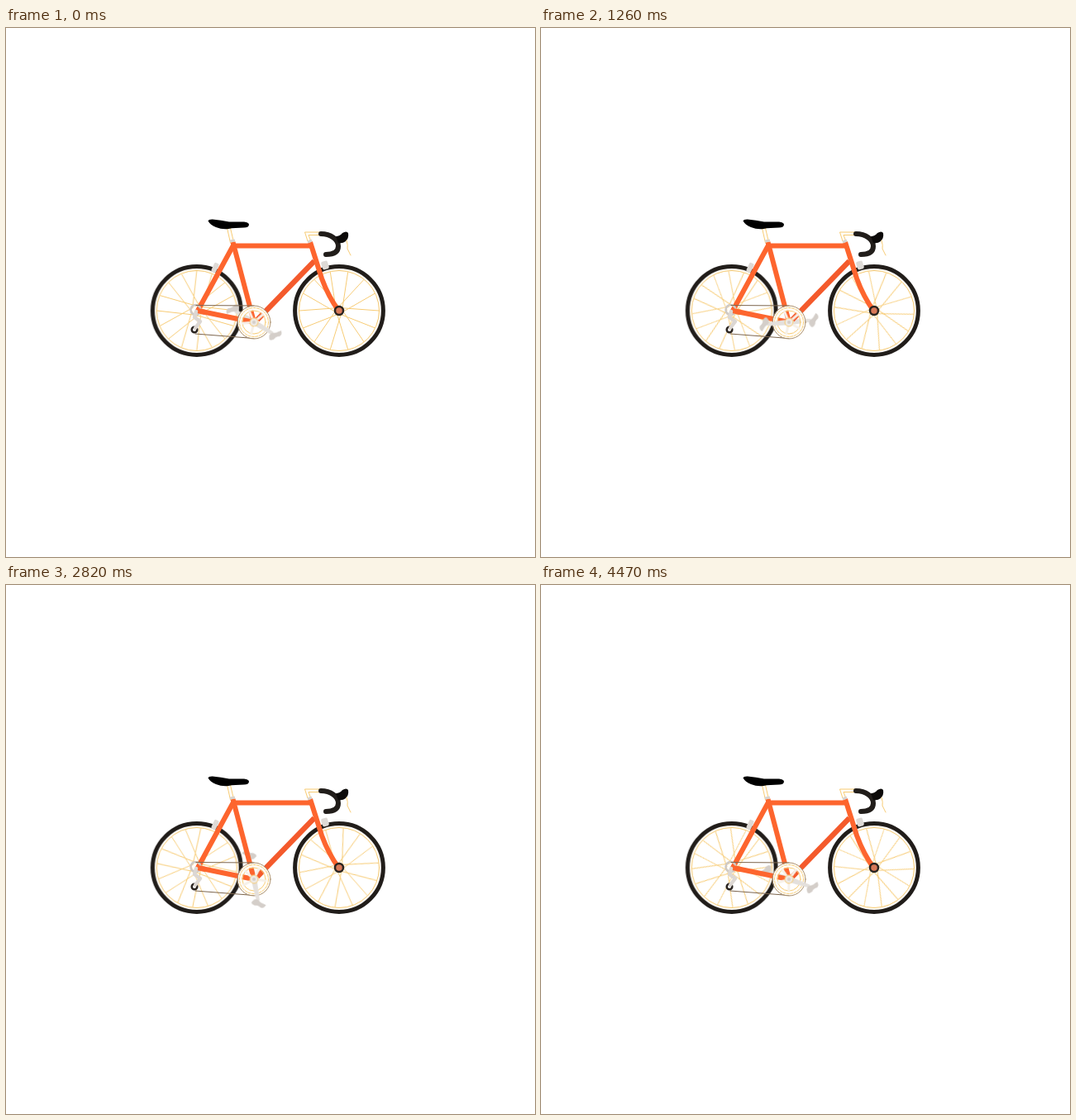
Recreate the animation shown at these times as an HTML page. Size 640x640 px, loop 4.5 s.

```html
<!DOCTYPE html>
<html lang="en">
<head>
<meta charset="utf-8">
<title>Road bike</title>
<style>
  html, body { margin: 0; width: 100%; height: 100%; overflow: hidden; background: #fff; }
  svg { display: block; width: 100%; height: 100%; }
  .line { fill: none; stroke-linecap: round; stroke-linejoin: round; }
  .gold { stroke: #f7cb74; stroke-width: 1; }
  .tube { stroke: #fd652e; stroke-width: 6; }
  .spin { animation: spin .45s steps(15) infinite; }
  .crank { animation: crank .9s steps(30) infinite; }
  .arm { fill: #e4e0dc; }
  .pedal { fill: #d4cec9; }
  @keyframes spin { to { transform: rotate(360deg); } }
  @keyframes crank { from { transform: rotate(31deg); } to { transform: rotate(391deg); } }
</style>
</head>
<body>
<svg viewBox="0 0 640 640">
  <defs>
    <g id="tyre" class="line">
      <circle r="49.5" stroke="#fefaf4" stroke-width="3"/>
      <circle r="48.5" class="gold"/>
      <circle r="53.4" stroke="#211d1a" stroke-width="5"/>
    </g>
    <g id="arm">
      <path class="arm" d="M0 -3.5L26 -2Q29 0 26 2L0 3.5Z"/>
      <path class="pedal" transform="translate(30 0) rotate(-42)"
        d="M-8 4Q-8 -3 -3 -3Q2 -2 8 -4Q9 1 5 2.500Q0 2 -2 4.500Q-6 6 -8 4Z"/>
    </g>
  </defs>

  <!-- wheels -->
  <g transform="translate(230.700 342)">
    <path class="line gold spin" data-spokes="16" data-hub="6"/>
    <use href="#tyre"/>
  </g>
  <g transform="translate(403 342)">
    <path class="line gold spin" data-spokes="14" data-hub="4"/>
    <use href="#tyre"/>
  </g>

  <!-- far crank -->
  <g transform="translate(300 356)">
    <g class="crank"><use href="#arm" transform="rotate(180)"/></g>
  </g>

  <!-- seat post and stem -->
  <path d="M267.500 242L271.500 242L275.500 259L271.500 260Z" fill="#fffdf8" class="gold"/>
  <path d="M365 258L361.500 247L380 247L380 250.500L366 250.500L369 258Z" fill="#fffdf8" class="gold"/>

  <!-- brakes -->
  <g fill="#dedad6">
    <rect x="-3" y="-6" width="6" height="12" rx="2" transform="translate(253 290) rotate(25)"/>
    <rect x="-4" y="-5" width="8" height="10" rx="2" transform="translate(386 287) rotate(-18)"/>
  </g>

  <!-- frame -->
  <g class="line tube" style="stroke-linecap:butt">
    <path d="M373 282L304 353" stroke-width="6.500" style="stroke:#f45a2c"/>
    <path d="M275 263.500H370"/>
    <path d="M274.500 259L300 356"/>
    <path d="M275.500 262L232 342L300 356"/>
    <path d="M368 259L382 303Q390 325 403 343"/>
  </g>
  <path d="M271 258L277 257M365 259L370 257" stroke="#d8d3ce" stroke-width="3"/>

  <!-- saddle -->
  <path d="M244.500 233.500Q245 231.300 250 231.500Q260 232.500 270 234.500L288 234.500Q294 235 294 238Q293.500 241.500 288 241.500Q277 241.500 269 243Q261 243.800 254 241Q247 238 244.500 233.500Z"/>

  <!-- handlebar -->
  <path class="line" d="M381 249C393 249 402 256 402 264C402 271 396 274 387 274" stroke="#211d1a" stroke-width="6"/>
  <path d="M399 252Q404 252 407 248Q412 245 414 248Q415 254 411 258Q407 261 402 260Z" fill="#0c0a09"/>
  <path class="line gold" d="M412 257Q414 263 413 267L417 275"/>

  <!-- hubs -->
  <circle cx="403" cy="342" r="5" fill="#d87958" stroke="#2a2420" stroke-width="2.500"/>
  <circle cx="229.500" cy="341" r="6" fill="none" stroke="#cfc9c4" stroke-width="2.500"/>
  <path class="tube line" d="M233 342.300L240 343.800"/>

  <!-- chain and derailleur -->
  <path class="line" d="M230 335.500L300 336M229 370L300 375.500" stroke="#7d664e" stroke-width="1.100"/>
  <circle cx="228" cy="365" r="3.300" fill="#fff" stroke="#2a2420" stroke-width="2.500"/>
  <path class="line" d="M230 343L228 350L235 355L229 363" stroke="#dcd7d3" stroke-width="4.500"/>

  <!-- chainring and near crank -->
  <g transform="translate(300 356)">
    <g class="line">
      <circle r="17" stroke="#fffdf9" stroke-width="5"/>
      <circle r="20" stroke="#a98e6b" stroke-width="1"/>
      <circle r="17.500" class="gold" stroke-dasharray="3 1.500"/>
      <circle r="14" class="gold"/>
    </g>
    <g class="crank">
      <path id="spider" class="line" stroke="#f6f0e8" stroke-width="3"/>
      <use href="#arm"/>
      <circle r="5" fill="#eeeae5" class="gold"/>
      <circle r="2" fill="#d4cec9"/>
    </g>
  </g>
</svg>
<script>
  const at = (r, a) => `${(r * Math.cos(a)).toFixed(2)} ${(r * Math.sin(a)).toFixed(2)}`;
  const rays = (n, inner, outer, lean) => Array.from({ length: n }, (_, i) => {
    const a = i / n * 2 * Math.PI;
    const side = i % 2 ? lean : -lean;
    return `M${at(inner, a + side)}L${at(outer, a)}`;
  }).join('');

  for (const el of document.querySelectorAll('[data-spokes]')) {
    el.setAttribute('d', rays(+el.dataset.spokes, +el.dataset.hub, 48, 1));
  }
  document.getElementById('spider').setAttribute('d', rays(5, 4, 14, 0));
</script>
</body>
</html>
```
